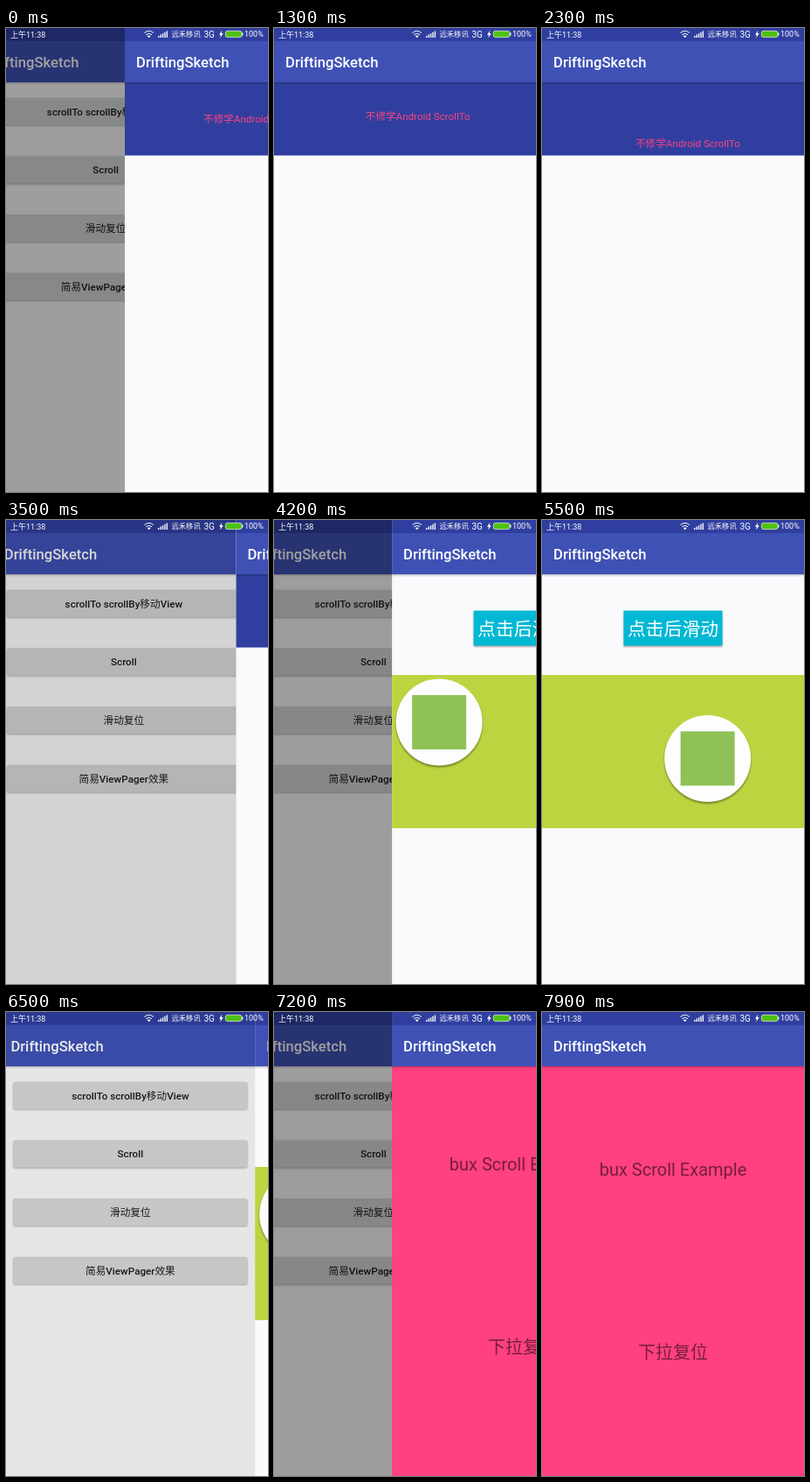
Write an HTML page that moves like this. It is 300 px wide and 530 px high and loops after 8000 ms.

```html
<!DOCTYPE html>
<html lang="zh-CN">
<head>
<meta charset="utf-8">
<title>Sliding pages</title>
<style>
  html, body { margin: 0; width: 100%; height: 100%; overflow: hidden; background: #fafafa; }
  svg { display: block; width: 100vw; height: 100vh; }
  text { font-family: Roboto, "Noto Sans CJK SC", "Noto Sans CJK", sans-serif; }
  .title { font-size: 16.67px; font-weight: 500; fill: #fff; }
  .item { font-size: 11.67px; font-weight: 500; fill: #1c1c1c; text-anchor: middle; }
  .mid { text-anchor: middle; }
  .status { font-size: 9px; fill: #fff; }
</style>
</head>
<body>
<svg viewBox="0 0 300 530" preserveAspectRatio="none">
  <defs>
    <linearGradient id="fade" x2="0" y2="1">
      <stop offset="0" stop-color="#000" stop-opacity=".22"/>
      <stop offset="1" stop-color="#000" stop-opacity="0"/>
    </linearGradient>
    <filter id="soft" x="-20%" y="-20%" width="140%" height="140%">
      <feGaussianBlur stdDeviation="1.2"/>
    </filter>
    <clipPath id="panel"><rect y="62" width="300" height="83.6"/></clipPath>
    <clipPath id="lime"><rect y="177" width="300" height="175"/></clipPath>
    <g id="bar">
      <rect width="300" height="15" fill="#303f9f"/>
      <rect y="15" width="300" height="47" fill="#3f51b5"/>
      <rect y="62" width="300" height="3" fill="url(#fade)"/>
      <text class="title" x="13" y="45">DriftingSketch</text>
    </g>
  </defs>

  <g id="list">
    <rect width="300" height="530" fill="#fafafa"/>
    <g id="items"></g>
    <use href="#bar"/>
  </g>
  <rect id="dim" width="300" height="530"/>

  <g class="page">
    <rect width="300" height="530" fill="#faf9fc"/>
    <rect y="62" width="300" height="83.6" fill="#303f9f"/>
    <g clip-path="url(#panel)">
      <text id="label" class="mid" font-size="11.6" fill="#ff4081">不修学Android ScrollTo</text>
    </g>
    <use href="#bar"/>
  </g>

  <g class="page">
    <rect width="300" height="530" fill="#faf9fc"/>
    <rect x="93.5" y="105" width="113" height="40" fill="#000" opacity=".35" filter="url(#soft)"/>
    <rect x="93.5" y="103.5" width="113" height="40" fill="#00b8d4"/>
    <text class="mid" x="150" y="132" font-size="20.8" fill="#fff">点击后滑动</text>
    <rect y="177" width="300" height="175" fill="#bdd441"/>
    <g clip-path="url(#lime)">
      <g id="icon">
        <circle cx="54" cy="233" r="49.5" opacity=".38" filter="url(#soft)"/>
        <circle cx="54" cy="231" r="49.5" fill="#fdfdfd"/>
        <rect x="23" y="200" width="62" height="62" fill="#8fc157"/>
      </g>
    </g>
    <use href="#bar"/>
  </g>

  <g class="page">
    <rect width="300" height="530" fill="#ff4081"/>
    <g id="pull" class="mid" font-size="20" fill="#000" fill-opacity=".54">
      <text x="150" y="187">bux Scroll Example</text>
      <text x="150" y="395.7">下拉复位</text>
    </g>
    <use href="#bar"/>
  </g>

  <g class="status">
    <text x="5" y="10.5">上午11:38</text>
    <path d="M158.5 5.6Q163.7 1.2 168.9 5.6M160.3 7.7Q163.7 4.9 167.1 7.7" fill="none" stroke="#fff"/>
    <path d="M161.7 9.1Q163.7 7.7 165.7 9.1L163.7 11.3Z"/>
    <path d="M174 11v-2h1.5v2zM176.4 11v-3.4h1.5v3.4zM178.8 11v-4.8h1.5v4.8zM181.2 11v-6.2h1.5v6.2zM183.6 11v-7.6h1.5v7.6z" opacity=".9"/>
    <text x="189.5" y="10.3" font-size="8.3">远禾移讯</text>
    <text x="226.5" y="10.6" font-size="10">3G</text>
    <path d="M247.3 2.8L244 7.8h2L245.2 11.6L248.8 6.3h-2.1z"/>
    <rect x="251.3" y="3.4" width="18.6" height="7.2" rx="2" fill="#4fc20f" stroke="#d9e6d9" stroke-width=".8"/>
    <rect x="270.2" y="5.3" width="1.2" height="3.4"/>
    <text x="273" y="10.4">100%</text>
  </g>
</svg>
<script>
const LOOP = 8000, SLIDE = 450, WIDTH = 300;
const $ = id => document.getElementById(id);
const pages = [...document.querySelectorAll('.page')];
const visits = [
  { open: -146, close: 3208 },
  { open: 4053, close: 6151 },
  { open: 7053, close: 9000 }
];
// time, centre x, centre y of the dragged label
const drag = [
  [1200, 150, 104], [1500, 208, 92], [1800, 92, 94],
  [2100, 163, 128], [2300, 167, 132], [2600, 121, 112]
];

$('items').innerHTML = ['scrollTo scrollBy移动View', 'Scroll', '滑动复位', '简易ViewPager效果']
  .map((name, i) => {
    const y = 79.7 + i * 66.7;
    return `<rect x="16" y="${y + 1}" width="268" height="31" rx="2" opacity=".3" filter="url(#soft)"/>
      <rect x="16" y="${y}" width="268" height="31" rx="2" fill="#d6d7d7"/>
      <text class="item" x="150" y="${y + 19.8}">${name}</text>`;
  }).join('');

const clamp = v => Math.max(0, Math.min(1, v));
const rest = u => (1 - clamp(u)) ** 2;
const smooth = u => (1 - Math.cos(Math.PI * u)) / 2;
const move = (el, x, y = 0) => el.setAttribute('transform', `translate(${x} ${y})`);

function viscous(u) {
  const f = x => x < 1 ? x - 1 + Math.exp(-x) : 1 - (1 - 1 / Math.E) * Math.exp(1 - x);
  return f(8 * clamp(u)) / f(8);
}

function track(points, t) {
  if (t <= points[0][0]) return points[0].slice(1);
  const i = points.findIndex(p => p[0] > t);
  if (i < 0) return points[points.length - 1].slice(1);
  const a = points[i - 1], b = points[i];
  const u = smooth((t - a[0]) / (b[0] - a[0]));
  return [a[1] + (b[1] - a[1]) * u, a[2] + (b[2] - a[2]) * u];
}

function draw(t) {
  let depth = 0;
  visits.forEach(({ open, close }, i) => {
    const shown = t >= open && t < close + SLIDE;
    pages[i].style.display = shown ? '' : 'none';
    if (!shown) return;
    const closing = t >= close;
    const cover = closing ? rest((t - close) / SLIDE) : 1 - rest((t - open) / SLIDE);
    depth = cover ** (closing ? 0.76 : 1.22);
    move(pages[i], WIDTH * (1 - cover));
  });
  move($('list'), -75 * depth);
  $('dim').setAttribute('opacity', 0.77 * depth);

  const [x, y] = track(drag, t);
  move($('label'), x, y + 4);

  const out = viscous((t - 4900) / 1000) - viscous((t - 5740) / 1000);
  move($('icon'), 137.5 * out, 42 * out);

  move($('pull'), 0, -6 * (1 - smooth(clamp((t - 7700) / 200))));
}

const start = performance.now();
function tick() {
  draw((performance.now() - start) % LOOP);
  requestAnimationFrame(tick);
}
tick();
</script>
</body>
</html>
```
